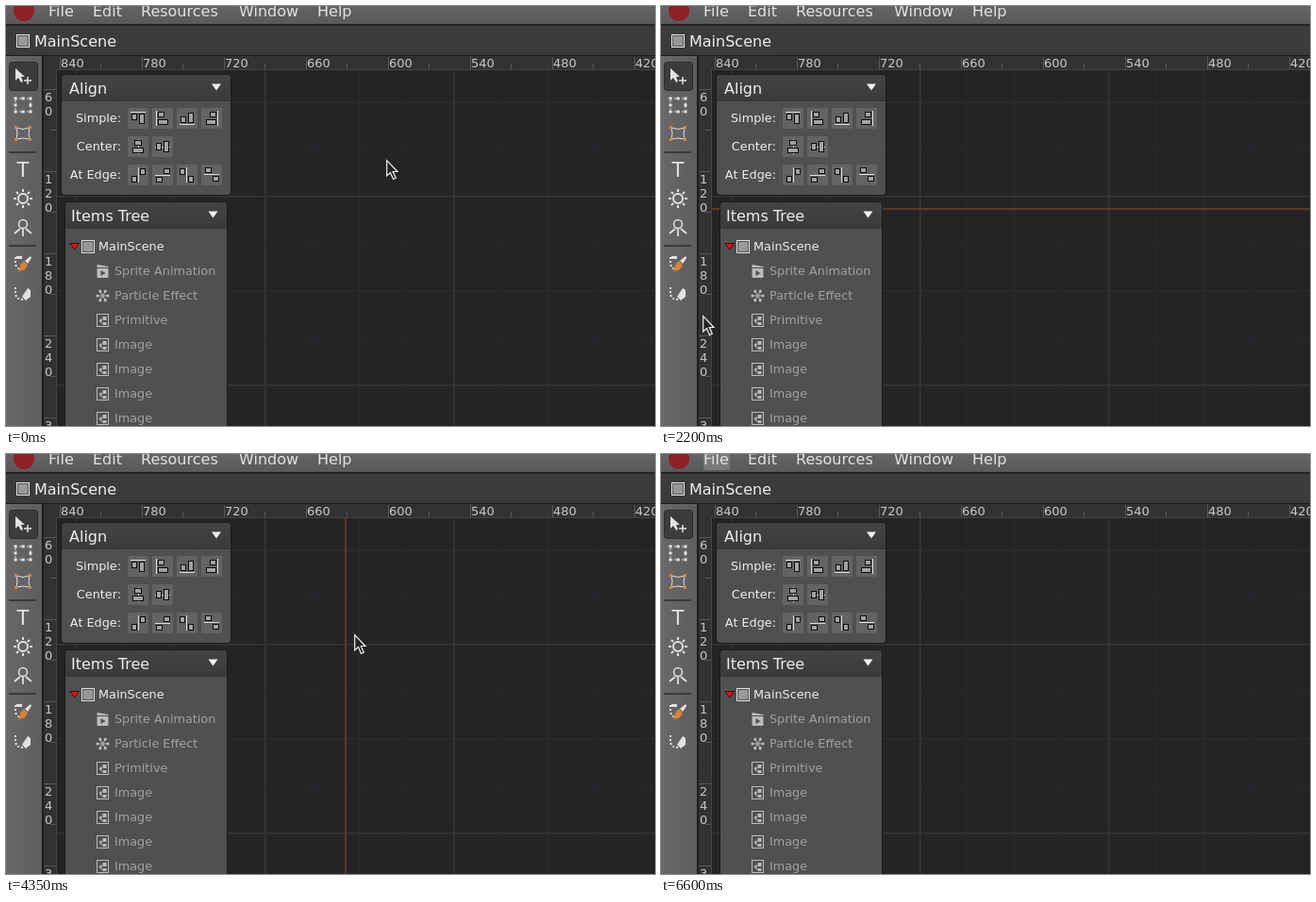
Recreate the animation shown at these times as an HTML page. Size 688x445 px, loop 6850 ms.

```html
<!DOCTYPE html>
<html>
<head>
<meta charset="utf-8">
<style>
html, body { margin: 0; height: 100%; overflow: hidden; background: #252326; }
svg { display: block; width: 688px; height: 445px; }
text { font-family: "DejaVu Sans", sans-serif; white-space: pre; }
</style>
</head>
<body>
<svg id="stage" viewBox="0 0 688 445"></svg>
<script>
const LOOP = 6850, STEP = 50, UNIT = 1.45;
const stage = document.getElementById('stage');

const rect = (x, y, w, h, fill, more = '') =>
  `<rect x="${x}" y="${y}" width="${w}" height="${h}" fill="${fill}" ${more}/>`;
const box = (x, y, w, h, fill, stroke, more = '') =>
  rect(x + .5, y + .5, w - 1, h - 1, fill, `stroke="${stroke}" ${more}`);
const path = (d, fill = 'none', stroke = 'none', more = '') =>
  `<path d="${d}" fill="${fill}" stroke="${stroke}" ${more}/>`;
const circle = (cy, r, fill, more = '') => `<circle cy="${cy}" r="${r}" fill="${fill}" ${more}/>`;
const text = (s, x, y, size = 12.8, fill = '#eee', more = '') =>
  `<text x="${x}" y="${y}" font-size="${size}" fill="${fill}" ${more}>${s}</text>`;
const group = (transform, body) => `<g transform="${transform}">${body}</g>`;
const at = (x, y, body) => group(`translate(${x} ${y})`, body);
const range = (n, f) => Array.from({ length: n }, (_, i) => f(i)).join('');
const around = (n, body) => range(n, i => group(`rotate(${i * 360 / n})`, body));

function grid() {
  // Wider spacing is painted later, so stronger lines stay on top
  return [[50, '#29272a'], [100, '#2c2a2d'], [200, '#363437']].map(([gap, shade]) =>
    range(650 / gap, i => rect(74 + i * gap, 67, 1.5, 378, shade) + rect(53, 1 + i * gap, 635, 1.5, shade))
  ).join('');
}

function rulers() {
  const back = '#333134', tick = '#59575a', ink = '#c8c8c8';
  return rect(39, 53, 649, 14, back) + rect(39, 53, 14, 392, back)
    + rect(53, 67, 635, 1, '#454346') + rect(53, 67, 1, 378, '#454346')
    + range(8, i => at(57 + 87 * i, 0, rect(0, 54, 1, 13, tick) + rect(43, 61, 1, 6, tick)
      + text(840 - 60 * i, 1, 65, 13, ink)))
    + range(5, i => at(41, 88 + 87 * i, rect(-1, 0, 13, 1, tick) + rect(6, 43, 6, 1, tick)
      + [...String(60 + 60 * i)].map((c, j) => text(c, 0, 13 + 15 * j, 13, ink)).join('')));
}

function toolbar() {
  const ink = '#e2e2e2', orange = '#d88435';
  const handles = range(9, i => i == 4 ? '' : rect(i % 3 * 8 - 9.5, Math.floor(i / 3) * 7 - 8.5, 3, 3, ink));
  const corners = range(4, i => rect(i % 2 * 15 - 9, (i >> 1) * 13 - 8, 3, 3, orange));
  const dots = path('M-8 -6V1Q-7 7 0 7', 'none', ink, 'stroke-width="2" stroke-dasharray="2 2"');
  const divider = y => rect(3, y, 29, 2, '#3a393b');
  return rect(0, 53, 38, 392, 'url(#side)') + rect(38, 53, 2, 392, '#1d1c1e')
    + box(3, 59, 31, 31, '#3c3b3e', '#2b2b2d', 'rx="3"')
    + at(18, 74, path('M-8 -8V5L-5 2 -2 7 0 6 -2 1H2Z', ink) + path('M5 1V9M1 5H9', 'none', ink, 'stroke-width="1.5"'))
    + at(18, 105, path('M-8 -7H8V7H-8Z', 'none', ink, 'stroke-dasharray="2 2"') + handles)
    + at(18, 135, path('M-7 -6Q0 -3 7 -6Q5 0 7 6Q0 4 -7 6Q-5 0 -7 -6Z', 'none', ink) + corners)
    + divider(154)
    + text('T', 18, 181, 21, ink, 'text-anchor="middle"')
    + at(18, 204, circle(0, 5, 'none', `stroke="${ink}" stroke-width="2"`)
      + around(8, path('M0 -7V-10', 'none', ink, 'stroke-width="2"')))
    + at(18, 235, circle(-4, 4.5, 'none', `stroke="${ink}" stroke-width="1.5"`)
      + path('M0 0V9M-3 1L-9 6M3 1L9 6', 'none', ink, 'stroke-width="1.7"'))
    + divider(253)
    + at(18, 272, dots + rect(-7, -7, 6, 3, ink) + path('M-2 1L1 -2 5 3 1 8 -5 9Z', orange)
      + path('M2 -2L8 -7 9 -5 5 1Z', ink))
    + at(18, 304, dots + path('M-1 4L5 -5 8 -3V4L3 8Z', ink));
}

function alignPanel() {
  const block = (x, y, w, h) => box(x, y, w, h, '#a2a3a4', '#0d0d0d');
  const line = y => rect(-8, y, 16, 1, '#dcdcdc');
  const rows = [
    ['Simple:', 4, line(-7) + block(-7, -5, 6, 7) + block(1, -5, 6, 11)],
    ['Center:', 2, line(0) + block(-7, -4, 6, 8) + block(1, -6, 6, 12)],
    ['At Edge:', 4, line(0) + block(-7, 2, 7, 6) + block(1, -7, 7, 6)]];
  // Each row turns one icon: every second one swaps axes, the later pair is mirrored
  const turn = (i, swap, icon) =>
    group((swap ? 'matrix(0 1 1 0 0 0) ' : '') + `scale(1 ${i < 2 ? 1 : -1})`, icon);
  return panel(59, 73, 179, 127, 'Align', 67, 223)
    + rows.map(([name, count, icon], row) => at(0, 119 + 30 * row,
      text(name, 122, 4, 12.8, '#eee', 'text-anchor="end"')
      + range(count, i => at(140 + 26 * i, 0,
        rect(-11, -11, 22, 22, '#626364', 'rx="1"') + turn(i, (i + (row > 0)) % 2, icon))))).join('');
}

function treePanel() {
  const ink = '#bcbcbc';
  const image = box(-6.5, -7, 13, 14, 'none', ink)
    + rect(0, -4, 4, 4, ink) + path('M-4 0L-1 -2V4ZM0 2H4V5H0Z', ink);
  const clip = rect(-6, -3, 12, 10, ink, 'rx="1"') + path('M-6 -7L6 -5V-4H-6Z', ink)
    + path('M-2 -1L3 2 -2 5Z', '#4e5051');
  const sparks = group('rotate(30)', around(6, path('M0 0V-5', 'none', ink) + circle(-5.5, 1.6, ink)));
  const rows = [['Sprite Animation', clip], ['Particle Effect', sparks], ['Primitive', image],
    ...Array(4).fill(['Image', image])];
  return panel(63, 208, 171, 250, 'Items Tree', 69, 219.5)
    + path('M68 251.5H77.5L72.700 258Z', '#e01515', '#4a0808')
    + sceneIcon(80, 248) + text('MainScene', 98, 259)
    + rows.map(([name, icon], i) => at(102.5, 281 + 26 * i, icon + text(name, 12.5, 4, 12.8, '#a0a1a2'))).join('');
}

function panel(x, y, w, h, title, textX, arrowX) {
  return rect(x - 1, y - 1, w + 2, h + 2, '#1a191b', 'rx="5"')
    + rect(x, y, w, h, '#4e5051', 'rx="4"')
    + rect(x, y, w, 28, 'url(#head)', 'rx="4"') + rect(x, y + 27, w, 1, '#353537')
    + text(title, textX, y + 20, 16)
    + path(`M${arrowX - 5} ${y + 9.5}h10l-5 7Z`, '#f2f2f2');
}

function sceneIcon(x, y) {
  return box(x, y, 14, 14, '#98989a', '#e4e4e4') + box(x + 1, y + 1, 12, 12, 'none', '#555');
}

function menu() {
  const names = { File: 45, Edit: 92, Resources: 143, Window: 247, Help: 330 };
  return rect(0, 0, 688, 20, 'url(#top)')
    + rect(45, 0, 28, 17, '#7b797c', 'id="hover"')
    + at(19, 5, circle(0, 11, '#8e2026'))
    + Object.entries(names).map(([s, x]) => text(s, x, 11, 16, '#e2e2e2')).join('')
    + rect(0, 20, 688, 33, '#3c3a3d') + rect(0, 19, 688, 2, '#262427') + rect(0, 52, 688, 1, '#1d1c1e')
    + sceneIcon(11, 30) + text('MainScene', 30, 43, 16);
}

const fade = (id, a, b, across) => `<linearGradient id="${id}" x2="${across ? 1 : 0}" y2="${across ? 0 : 1}">
  <stop stop-color="${a}"/><stop offset="1" stop-color="${b}"/></linearGradient>`;

stage.innerHTML = `<defs>${fade('top', '#656366', '#5a585b')}${fade('side', '#69676a', '#5e5c5f', true)}
  ${fade('head', '#444446', '#3a3a3c')}</defs>`
  + grid() + rulers() + menu() + toolbar()
  + rect(53, 0, 635, 2, '', 'id="across"') + rect(0, 67, 2, 378, '', 'id="down"')
  + text('', 0, 0, 12.8, '#f2f2f2', 'id="label"')
  + alignPanel() + treePanel()
  + path('M.7 .7V17L4.500 13.500 7.500 20.500 10.300 19.300 7.200 12.500H12Z', '#242326', '#f4f4f4', 'id="cursor" stroke-width="1.2"');

const [across, down, label, cursor, hover] =
  ['across', 'down', 'label', 'cursor', 'hover'].map(id => document.getElementById(id));

// Pointer moves: start, end, x, y; it rests in between
const moves = [
  [100, 450, 425, 58], [500, 950, 457, 211], [1400, 1700, 24, 325],
  [1850, 2200, 44, 328], [2200, 2650, 361, 232], [2750, 2900, 429, 226],
  [3150, 3250, 434, 213], [3550, 3850, 425, 39], [3850, 4150, 379, 191],
  [4200, 4350, 369, 191], [4650, 4750, 361, 190], [4900, 4950, 359, 190],
  [5200, 5400, 3, 190], [5500, 5550, 1, 209], [5750, 6300, 95, 7],
  [6300, 6450, 75, 27], [6450, 6550, 68, 4]];

function pointer(t) {
  let x = 403, y = 163;
  for (const [start, end, toX, toY] of moves) {
    const p = Math.min(1, Math.max(0, (t - start) / (end - start)));
    const ease = p * p * (3 - 2 * p);
    x += (toX - x) * ease;
    y += (toY - y) * ease;
  }
  return [Math.round(x), Math.round(y)];
}

function guide(el, axis, pos, min, shown, bright) {
  el.style.display = shown && pos >= min ? '' : 'none';
  el.setAttribute(axis, pos);
  el.setAttribute('fill', bright ? '#b07b5c' : '#5c3a25');
}

function draw(now) {
  const t = Math.floor(now % LOOP / STEP) * STEP;
  const within = (a, b) => t >= a && t < b;
  const [x, y] = pointer(t);

  const pull = within(500, 1400), push = within(3550, 3850);
  const gy = pull ? y + 3 : push ? y + 1 : 214;
  guide(across, 'y', gy, 67, within(500, 3850), within(500, 1450) || t >= 3200);

  const pullX = within(2250, 2800), pushX = within(5150, 5550);
  const gx = pullX ? x - 2 : pushX ? x - 3 : 359;
  guide(down, 'x', gx, 53, within(2250, 5550), within(2250, 2850) || t >= 4950);

  const comma = v => v.toFixed(2).replace('.', ',');
  const dragY = pull || push, dragX = pullX || pushX;
  label.textContent = dragY ? 'Y: ' + comma((.6 - gy) / UNIT)
    : dragX ? 'X: ' + comma((gx + 1) / UNIT - 879.46) : '';
  label.setAttribute('x', dragY ? x + 17 : gx + 16);
  label.setAttribute('y', y + 23);

  cursor.setAttribute('transform', `translate(${x} ${y})`);
  cursor.style.display = t < 6600 ? '' : 'none';
  hover.style.display = t >= 6500 ? '' : 'none';
}

const start = performance.now();
function frame() {
  draw(performance.now() - start);
  requestAnimationFrame(frame);
}
frame();
</script>
</body>
</html>
```
